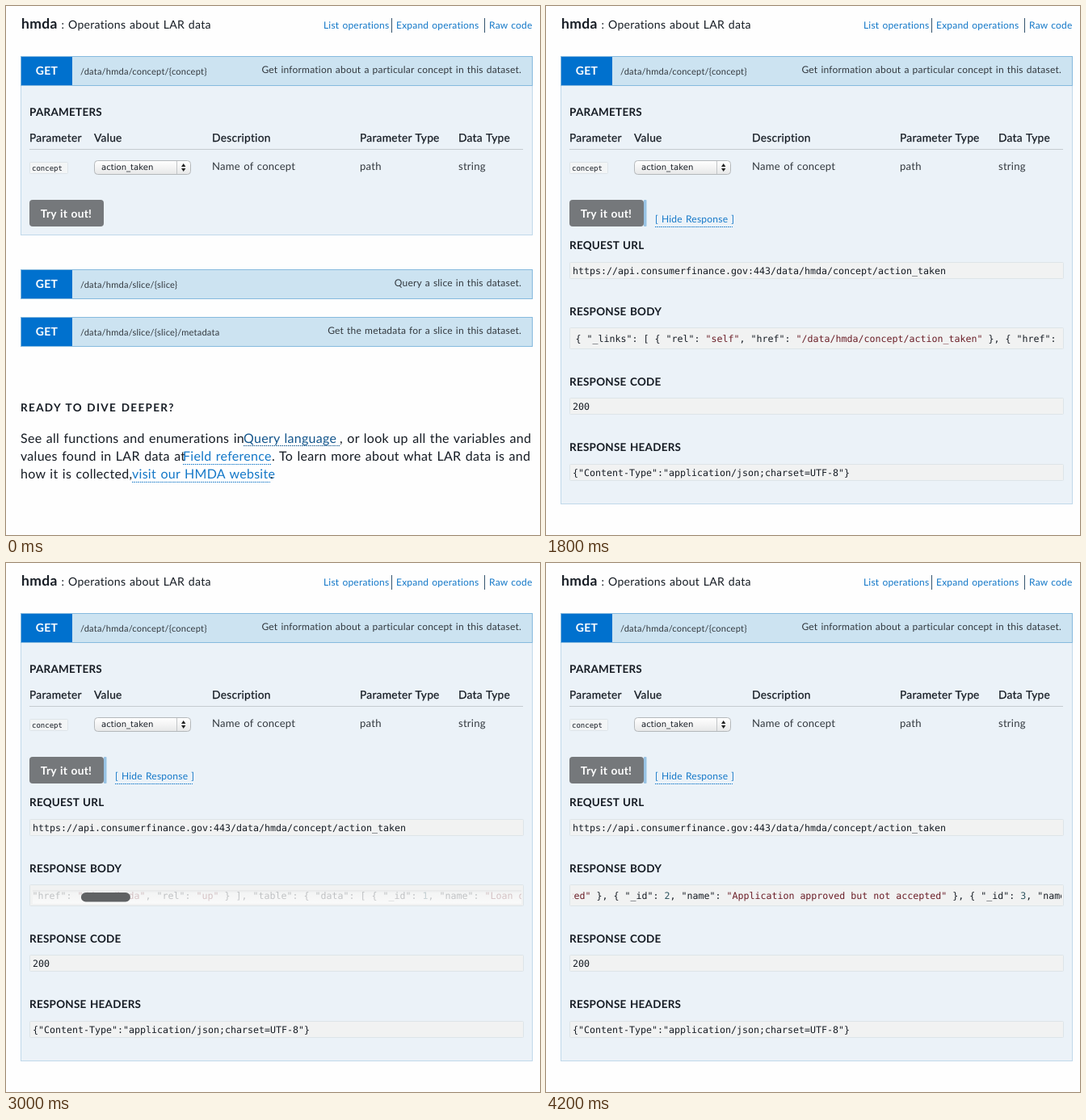
An HTML page that plays this animation: 661 by 655 pixels, repeating every 5000 ms.

```html
<!DOCTYPE html>
<html lang="en">
<head>
<meta charset="utf-8">
<title>API explorer</title>
<style>
html, body { margin: 0; width: 100%; height: 100%; overflow: hidden; background: #fefefe; }
svg { display: block; }
text { font-family: Lato, "Open Sans", sans-serif; letter-spacing: .0175em; word-spacing: .0625em;
  fill: #161c24; white-space: pre; text-rendering: geometricPrecision; }
.bold { font-weight: 700; }
.medium { stroke: #161c24; stroke-width: .25px; }
.soft { fill: #33393f; }
.link { fill: #1478c8; }
.deep { fill: #14568c; }
.white { fill: #fff; font-weight: 700; }
.spaced { font-weight: 700; letter-spacing: 1.35px; }
.mono { font-family: "DejaVu Sans Mono", monospace; letter-spacing: 0; word-spacing: 0; }
.ui { font-family: "DejaVu Sans", sans-serif; letter-spacing: 0; word-spacing: 0; }
.str { fill: #6b1f28; }
.num { fill: #2f5560; }
.end { text-anchor: end; }
.mid { text-anchor: middle; }
</style>
</head>
<body>
<svg id="stage" width="661" height="655" viewBox="0 0 661 655"></svg>
<script>
const text = (x, y, size, str, cls = '') =>
  `<text x="${x}" y="${y}" font-size="${size}" class="${cls}">${str}</text>`;
const rect = (x, y, w, h, fill, more = '') =>
  `<rect x="${x}" y="${y}" width="${w}" height="${h}" fill="${fill}" ${more}/>`;
const framed = (x, y, w, h, fill, line, r = 0) =>
  rect(x + .5, y + .5, w - 1, h - 1, fill, `stroke="${line}" rx="${r}"`);
const line = (x1, y1, x2, y2, color, more = '') =>
  `<path d="M${x1} ${y1}L${x2} ${y2}" stroke="${color}" ${more}/>`;
const dotted = (x1, x2, y, color = '#1478c8') =>
  line(x1, y, x2, y, color, 'stroke-dasharray="1.5 1"');

const endpoint = (y, path, summary) =>
  framed(18, y, 634, 37, '#cce3f1', '#86bade') +
  rect(19, y + 1, 63, 35, '#0071ce') +
  text(50.5, y + 23, 14, 'GET', 'white mid') +
  text(92, y + 23, 11.1, path, 'soft') +
  text(638, y + 21, 12, summary, 'soft end');

const field = (title, titleY, boxY, h, value) =>
  text(29, titleY, 13.5, title, 'bold') +
  framed(29, boxY, 612, h, '#f1f2f2', '#dde4e8', 1) +
  (value ? text(33, boxY + 15, 11.63, value, 'mono') : '');

const header =
  text(19, 28, 17.5, 'hmda', 'bold') + text(68.5, 28, 14, ':') +
  text(77, 28, 14.1, 'Operations about LAR data') +
  text(393, 28, 12, 'List operations', 'link') +
  text(483, 28, 12, 'Expand operations', 'link') +
  text(598, 28, 12, 'Raw code', 'link') +
  line(477.5, 15, 477.5, 33, '#34546e') + line(592.5, 15, 592.5, 33, '#34546e');

const columns = [
  [29, 'Parameter'], [109, 'Value'], [255, 'Description', 'Name of concept'],
  [438, 'Parameter Type', 'path'], [560, 'Data Type', 'string']
];

const parameters =
  text(29, 136, 13.5, 'PARAMETERS', 'bold') +
  columns.map(([x, head, value]) =>
    text(x, 168, 13.8, head, 'medium') + (value ? text(x, 203, 13.1, value, 'soft') : '')).join('') +
  line(29, 177.5, 640, 177.5, '#c5cbd0') +
  framed(29, 193, 48, 15, '#f3f5f6', '#dde4e9', 1) + text(32, 204, 9, 'concept', 'mono') +
  framed(109, 191, 120, 18, 'url(#select)', '#b4b8bb', 4) +
  line(211.5, 192, 211.5, 208, '#c3c6c8') +
  '<path d="M217 199l2.7-4 2.7 4zM217 201l2.7 4 2.7-4z" fill="#222"/>' +
  text(118, 203, 10.1, 'action_taken', 'ui');

const body = ('{ "_links": [ { "rel": "self", "href": "/data/hmda/concept/action_taken" }, ' +
  '{ "href": "/data/hmda", "rel": "up" } ], "table": { "data": [ ' +
  '{ "_id": 1, "name": "Loan originated" }, ' +
  '{ "_id": 2, "name": "Application approved but not accepted" }, ' +
  '{ "_id": 3, "name": "Application denied by financial institution" }')
  .replace(/(?<=: )("[^"]*"|\d)/g, v => `<tspan class="${v[0] === '"' ? 'str' : 'num'}">${v}</tspan>`);

const response =
  rect(121, 240, 3.5, 33, '#98c3e4', 'rx="1"') +
  text(135, 268, 12.05, '[ Hide Response ]', 'link') + dotted(135, 231, 273.5) +
  field('REQUEST URL', 301, 317, 21, 'https://api.consumerfinance.gov:443/data/hmda/concept/action_taken') +
  field('RESPONSE BODY', 383, 398, 27) +
  `<g clip-path="url(#view)"><g id="scroll">${text(36.5, 416, 11.63, body, 'mono')}</g></g>` +
  '<g id="bar">' + rect(33, 405, 605, 17, 'url(#track)') +
  rect(0, 408, 61, 11.5, '#606264', 'id="thumb" rx="5.75"') + '</g>' +
  field('RESPONSE CODE', 470, 485, 21, '200') +
  field('RESPONSE HEADERS', 551, 567, 21, '{"Content-Type":"application/json;charset=UTF-8"}');

const below =
  endpoint(326, '/data/hmda/slice/{slice}', 'Query a slice in this dataset.') +
  endpoint(385, '/data/hmda/slice/{slice}/metadata', 'Get the metadata for a slice in this dataset.') +
  text(18, 502, 13.5, 'READY TO DIVE DEEPER?', 'spaced') +
  text(18, 541, 16, 'See all functions and enumerations in') +
  text(294, 541, 16, 'Query language', 'deep') + dotted(294, 413, 544.5, '#14568c') +
  text(413, 541, 16, ', or look up all the variables and') +
  text(18, 563, 16, 'values found in LAR data at') +
  text(219, 563, 16, 'Field reference', 'link') + dotted(219, 329, 567.5) +
  text(329, 563, 16, '. To learn more about what LAR data is and') +
  text(18, 585, 16, 'how it is collected,') +
  text(156, 585, 16, 'visit our HMDA website', 'link') + dotted(156, 327, 589.5) +
  text(327, 585, 16, '.');

const gradient = (id, stops) =>
  `<linearGradient id="${id}" x2="0" y2="1">${stops.map(([at, color, alpha]) =>
    `<stop offset="${at}" stop-color="${color}" stop-opacity="${alpha}"/>`).join('')}</linearGradient>`;

stage.innerHTML =
  '<defs>' + gradient('select', [[0, '#fff', 1], [.5, '#f4f4f4', 1], [1, '#e6e7e8', 1]]) +
  gradient('track', [[0, '#e2e3e4', .75], [.2, '#f4f5f5', .75], [1, '#fcfcfc', .78]]) +
  '<clipPath id="view">' + rect(33, 399, 605, 25, '#000') + '</clipPath></defs>' +
  header + framed(18, 98, 634, 186, '#ebf2f8', '#c0d8ea').replace('<rect', '<rect id="panel"') +
  endpoint(62, '/data/hmda/concept/{concept}', 'Get information about a particular concept in this dataset.') +
  parameters + rect(29, 240, 92, 33, '#75787b', 'id="button" rx="4"') +
  text(74.5, 262, 13.8, 'Try it out!', 'white mid') +
  `<g id="response">${response}</g><g id="below">${below}</g>`;

const el = id => document.getElementById(id);
// Scroll distance for each 200 ms step, starting at 2400 ms
const offsets = [81, 190, 338, 550, 790, 994, 1120, 1206];

function draw(now) {
  const t = now % 5000;
  const grow = t < 1600 ? 0 : t < 1800 ? 321 : 333;
  const step = Math.floor((t - 2400) / 200);
  const offset = step < 0 ? 0 : offsets[Math.min(step, offsets.length - 1)];

  el('button').setAttribute('fill', t >= 1400 && t < 1800 ? '#919395' : '#75787b');
  el('panel').setAttribute('height', 185 + grow);
  el('below').setAttribute('transform', `translate(0 ${grow})`);
  el('response').style.display = grow ? '' : 'none';
  el('scroll').setAttribute('transform', `translate(${-offset} 0)`);
  el('bar').style.display = t >= 2400 && t < 4200 ? '' : 'none';
  el('thumb').setAttribute('x', 34.5 + offset * .1062);
  requestAnimationFrame(draw);
}
requestAnimationFrame(draw);
</script>
</body>
</html>
```
